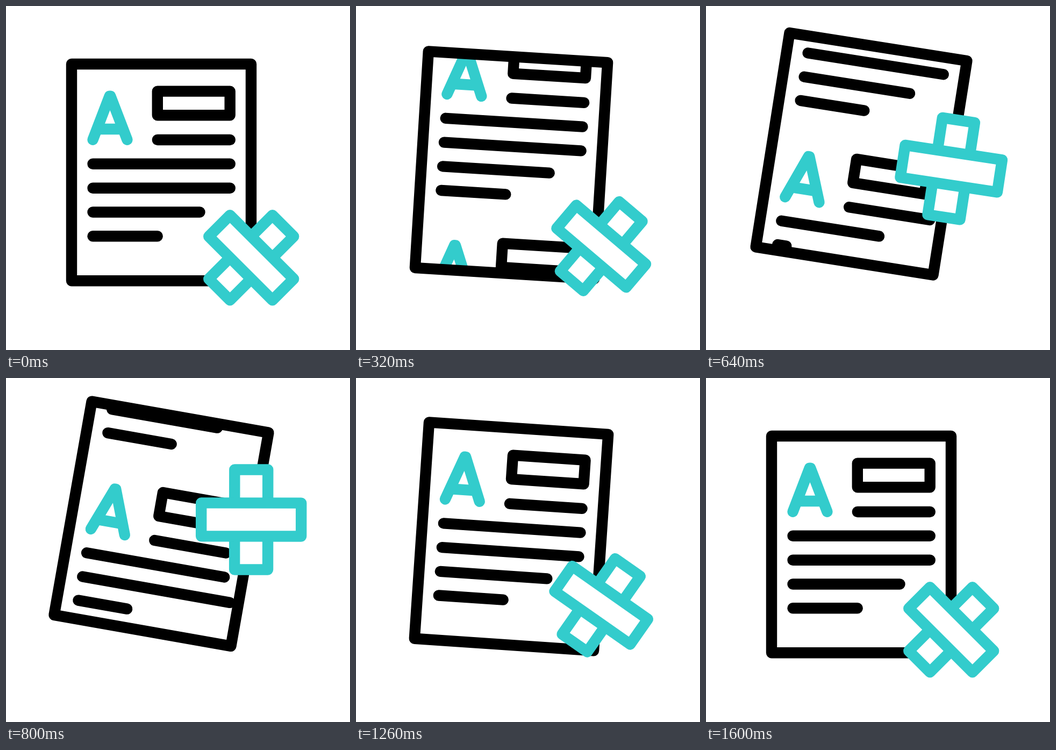
Recreate the animation shown at these times as an HTML page with a canvas. Size 640x640 px, loop 1.82 s.

```html
<!DOCTYPE html>
<html lang="en">
<head>
<meta charset="utf-8">
<title>Scrolling article</title>
<style>
  html, body { margin: 0; height: 100%; overflow: hidden; background: #fff; }
  canvas { display: block; width: 100vw; height: 100vh; }
</style>
</head>
<body>
<canvas width="640" height="640"></canvas>
<script>
const ctx = document.querySelector('canvas').getContext('2d');
const LOOP = 1820, STROKE = 20.4, TEAL = '#33cccc', BLACK = '#000';
const PAGE = { x: 122, y: 108, w: 334, h: 403.3 };
const COPY_GAP = 361;
// Text lines: left, right, y
const LINES = [
  [281.8, 416.8, 249], [161.5, 416.8, 293.8], [161.5, 416.8, 338.7],
  [161.5, 360.5, 383.5], [161.5, 281.7, 428.2]
];

// Eased progress from 0 to 1 between two times
function ease(t, start, end) {
  const u = Math.min(1, Math.max(0, (t - start) / (end - start)));
  return u * u * (3 - 2 * u);
}

function polyline(points) {
  ctx.beginPath();
  points.forEach(([x, y]) => ctx.lineTo(x, y));
  ctx.stroke();
}

function drawArticle(offset, lineScale) {
  ctx.save();
  ctx.translate(0, offset);
  ctx.strokeStyle = TEAL;
  polyline([[161.5, 248.8], [192.6, 167.8], [194.4, 167.8], [225.5, 248.8]]);
  polyline([[171, 229], [216, 229]]);
  ctx.strokeStyle = BLACK;
  ctx.strokeRect(281.8, 158.6, 134.9, 44.6);
  LINES.forEach(([left, right, y], i) => {
    const scale = lineScale(i);
    if (scale > 0) polyline([[left, y], [left + (right - left) * scale, y]]);
  });
  ctx.restore();
}

function drawPage(t) {
  const tilt = ease(t, 0, 800) - ease(t, 800, 1600);
  const scroll = COPY_GAP * ease(t, 0, 1200);
  // Entering lines grow one after another, overshoot and settle
  const grow = i => {
    const start = 417 + 96.5 * i, peak = start + 215;
    return 1.13 * ease(t, start, peak) - 0.13 * ease(t, peak, peak + 96);
  };
  const cx = PAGE.x + PAGE.w / 2, cy = PAGE.y + PAGE.h / 2;

  ctx.save();
  ctx.translate(cx, cy - 38.4 * tilt);
  ctx.rotate(tilt * Math.PI / 18);
  ctx.translate(-cx, -cy);
  ctx.save();
  ctx.beginPath();
  ctx.rect(PAGE.x, PAGE.y, PAGE.w, PAGE.h);
  ctx.clip();
  drawArticle(-scroll, () => 1);
  drawArticle(COPY_GAP - scroll, grow);
  ctx.restore();
  ctx.strokeRect(PAGE.x, PAGE.y, PAGE.w, PAGE.h);
  ctx.restore();
}

function drawCross(t) {
  const lift = ease(t, 198, 814) - ease(t, 877, 1429);
  const size = 1 + 0.11 * lift;
  const long = 83.8 * size, short = 27.9 * size;
  const bar = (w, h) => {
    ctx.fillRect(-w, -h, 2 * w, 2 * h);
    ctx.strokeRect(-w, -h, 2 * w, 2 * h);
  };

  ctx.save();
  ctx.translate(456.2, 468.2 - 205 * lift);
  ctx.rotate((1 - lift) * Math.PI / 4);
  ctx.strokeStyle = TEAL;
  ctx.fillStyle = '#fff';
  bar(short, long);
  bar(long, short);
  ctx.restore();
}

function draw(now) {
  const t = now % LOOP;
  ctx.fillStyle = '#fff';
  ctx.fillRect(0, 0, 640, 640);
  ctx.lineWidth = STROKE;
  ctx.lineCap = ctx.lineJoin = 'round';
  ctx.strokeStyle = BLACK;
  drawPage(t);
  drawCross(t);
  requestAnimationFrame(draw);
}
requestAnimationFrame(draw);
</script>
</body>
</html>
```
